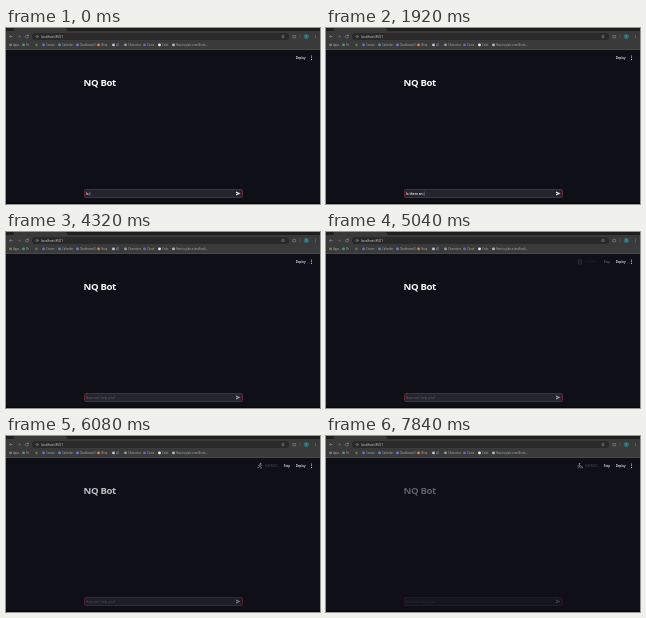
Recreate the animation shown at these times as an HTML page. Size 314 px wide and 176 px high, loop 8000 ms.

```html
<!DOCTYPE html>
<html lang="en">
<head>
<meta charset="utf-8">
<title>Chat app</title>
<style>
  html, body { margin: 0; width: 100%; height: 100%; overflow: hidden; background: #0f0f17; }
  svg { display: block; width: 100vw; height: 100vh; }
  text { font-family: "Open Sans", "Noto Sans", sans-serif; fill: #fafafa; white-space: pre; }
  .title { font-size: 9.6px; font-weight: 700; letter-spacing: -.35px; }
  .small { font-size: 3.25px; font-weight: 600; }
  .hint { font-size: 3.15px; fill: #666872; }
  .mark { font-size: 2.6px; fill: #b0b1b1; }
  .url { font-size: 3.3px; fill: #d4d4d4; }
  .line { fill: none; stroke: #97989a; stroke-width: .5; stroke-linecap: round; stroke-linejoin: round; }
  .man { fill: none; stroke: #9a9ba0; stroke-width: .55; stroke-linecap: round; }

  .loop { animation: 8s linear infinite; }
  .step { animation: 8s step-end infinite; }
  .stale { animation-name: stale; }
  .caret { animation-name: type; }
  .draft { animation-name: draft; }
  .empty { animation-name: empty; }
  .status { animation-name: status; }
  .bike { animation-name: bike; }
  .run { animation-name: run; }
  .pair { animation-name: pair; }
  .shift { animation-name: shift; }

  @keyframes stale {
    0% { opacity: 1 }
    68% { opacity: 1; animation-timing-function: ease-in }
    82.5%, 100% { opacity: .34 }
  }
  @keyframes type {
    0% { transform: translateX(3.5px) }
    1% { transform: translateX(4.7px) }
    3% { transform: translateX(6.7px) }
    5% { transform: translateX(8.6px) }
    6% { transform: translateX(10px) }
    8% { transform: translateX(11.9px) }
    10% { transform: translateX(12.8px) }
    18% { transform: translateX(14.7px) }
    20% { transform: translateX(16.8px) }
    24% { transform: translateX(17.7px) }
    28% { transform: translateX(19.7px) }
    29% { transform: translateX(21.7px) }
    30% { transform: translateX(22.6px) }
    32% { transform: translateX(25.6px) }
    34% { transform: translateX(27.5px) }
    38% { transform: translateX(28.4px) }
    40% { transform: translateX(30.3px) }
    44% { transform: translateX(32.3px) }
    46% { transform: translateX(34.2px) }
    50%, 100% { transform: translateX(35.8px) }
  }
  @keyframes draft { 0% { opacity: 1 } 52%, 100% { opacity: 0 } }
  @keyframes empty { 0% { opacity: 0 } 52%, 100% { opacity: 1 } }
  @keyframes status { 0%, 59% { opacity: 0 } 63% { opacity: .35 } 69%, 100% { opacity: 1 } }
  @keyframes bike { 0% { opacity: 1 } 68%, 100% { opacity: 0 } }
  @keyframes run { 0% { opacity: 0 } 68% { opacity: 1 } 81%, 100% { opacity: 0 } }
  @keyframes pair { 0% { opacity: 0 } 81%, 100% { opacity: 1 } }
  @keyframes shift {
    0% { transform: none } 87% { transform: translateX(.4px) }
    92% { transform: none } 96% { transform: translateX(.4px) } 98%, 100% { transform: none }
  }
</style>
</head>
<body>
<svg viewBox="0 0 314 176" preserveAspectRatio="none">
  <defs><path id="send" d="M230 163.4L234.4 165.5L230 167.6V166L232.6 165.5L230 165Z"/></defs>
  <rect width="314" height="176" fill="#0f0f17"/>

  <!-- browser -->
  <rect width="314" height="3" fill="#1e1f1f"/>
  <path d="M8 0H60Q61 2 62 3H7Q8 2 8 0Z" fill="#383938"/>
  <rect y="3" width="314" height="18" fill="#393a39"/>
  <rect y="21" width="314" height="1" fill="#4a4a42"/>
  <rect x="26" y="5" width="257" height="7" rx="3.5" fill="#282928"/>
  <g class="line">
    <path d="M6.4 8.5H3.6M4.8 7.3L3.6 8.5L4.8 9.7"/>
    <path d="M11.8 8.5H14.6M13.4 7.3L14.6 8.5L13.4 9.7" opacity=".5"/>
    <path d="M22.3 7.7A1.5 1.5 0 1 0 22.5 9M22.4 6.8V7.8H21.4"/>
    <circle cx="31" cy="8.5" r="1.1"/>
    <path d="M277 7.1L277.4 8.1H278.5L277.6 8.8L277.9 9.8L277 9.2L276.1 9.8L276.4 8.8L275.5 8.1H276.6Z" stroke-width=".4"/>
    <path d="M287.2 7.4H289.6V9.8H287.2Z"/>
    <path d="M294.2 6.5V10.7" opacity=".35"/>
  </g>
  <text class="url" x="34.8" y="9.7">localhost:8501</text>
  <circle cx="300.3" cy="8.5" r="2.5" fill="#2c7278"/>
  <text class="mark" x="299.7" y="9.3">s</text>
  <g fill="#b0b1b1">
    <circle cx="309.5" cy="7.2" r=".35"/><circle cx="309.5" cy="8.5" r=".35"/><circle cx="309.5" cy="9.8" r=".35"/>
  </g>
  <g id="marks"></g>

  <!-- page header -->
  <text class="small" x="289.8" y="31" style="font-size:2.9px">Deploy</text>
  <g fill="#e6e6e8">
    <circle cx="305.5" cy="28" r=".5"/><circle cx="305.5" cy="29.7" r=".5"/><circle cx="305.5" cy="31.4" r=".5"/>
  </g>
  <g class="status loop">
    <g class="man">
      <path class="bike step" d="M252.7 27.8H255.3V32H252.7ZM252.7 29.9H255.3"/>
      <g class="run step">
        <circle cx="254.5" cy="27.6" r=".4"/>
        <path d="M254.2 28.5L253.8 30.2L255 31L255.3 32.3M253.8 30.2L253 31.4L251.8 31.7M252.4 29.5L254.2 28.5L256 29.5"/>
      </g>
      <g class="pair step"><g class="shift step">
        <circle cx="253.4" cy="27.7" r=".4"/>
        <path d="M253.3 28.6V30.3L252 32M253.3 30.3L254.2 32M251.6 30L253.3 28.8L255.2 30V32M256.4 30.6V32"/>
      </g></g>
    </g>
    <text x="259" y="31" style="font-size:2.7px;fill:#484a52">RUNNING...</text>
    <text class="small" x="277.8" y="31" style="font-size:2.9px">Stop</text>
  </g>

  <!-- chat -->
  <g class="stale loop">
    <text class="title" x="77.5" y="57.7">NQ Bot</text>
    <rect x="78.5" y="161.5" width="158" height="8" rx="1.2" fill="#24252e" stroke="#6b2230"/>
    <g class="draft step">
      <text class="small" x="80" y="166.8">Is there an online 453?</text>
      <g class="caret step">
        <rect x="80.1" y="162.6" width="60" height="6" fill="#24252e"/>
        <rect x="80.3" y="163.6" width=".35" height="4.2" fill="#fafafa" opacity=".7"/>
      </g>
      <use href="#send" fill="#fafafa"/>
    </g>
    <g class="empty step">
      <text class="hint" x="80" y="166.8">How can I help you?</text>
      <use href="#send" fill="#a2a3a8"/>
    </g>
  </g>
  <rect y="174.6" width="314" height="1.4" fill="#07080c"/>
</svg>
<script>
  // Bookmarks: x, icon colour, label
  const marks = [
    [3, "#8a7a68", "Apps"], [16, "#4f9a62", "Fit"], [29, "#3f7f54", ""],
    [36, "#7668c8", "Course"], [52, "#4a8fd0", "Calendar"], [70, "#6d7bd0", "Dashboard S"],
    [91, "#e5813c", "Shop"], [106, "#b8cce4", "AI"], [118, "#98999a", "Chat notes"],
    [137, "#7060c8", "Cloud"], [152, "#f0f0f0", "Code"], [166, "#b9babb", "How to plan a small task..."]
  ];
  document.getElementById("marks").innerHTML = marks.map(([x, color, label]) =>
    `<circle cx="${x + 1.5}" cy="16.9" r="1.4" fill="${color}"/><text class="mark" x="${x + 4.2}" y="17.8">${label}</text>`
  ).join("");
</script>
</body>
</html>
```
